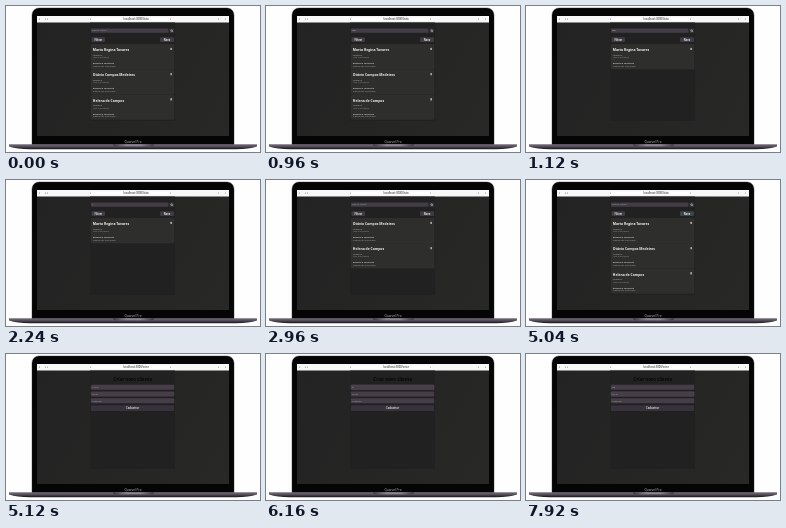
Recreate the animation shown at these times as an HTML page with a canvas. Size 254x146 px, loop 8 s.

```html
<!DOCTYPE html>
<html lang="pt-BR">
<head>
<meta charset="utf-8">
<title>Clientes</title>
<style>
html, body { margin: 0; width: 100%; height: 100%; overflow: hidden; background: #fefefe; }
canvas { display: block; width: 100vw; height: 100vh; }
</style>
</head>
<body>
<canvas></canvas>
<script>
const W = 254, H = 146, LOOP = 8000;
const canvas = document.querySelector('canvas');
const ctx = canvas.getContext('2d');
const clients = ['Marta Regina Tavares', 'Otávio Campos Medeiros', 'Helena de Campos'];

// Each entry is [start time, value]; the latest one reached is shown.
const searchText = [[0, ''], [880, 'm'], [960, 'ma'], [1680, 'm'], [1920, ''],
  [2160, 'c'], [2960, ''], [3040, '']];
const results = [[0, [0, 1, 2]], [1120, [0]], [2480, [1, 2]], [3440, [0, 1, 2]]];
const nameText = [[0, ''], [6160, 'C'], [6240, 'Cli']];
const at = (steps, t) => steps.filter(s => s[0] <= t).pop()[1];

function box(x, y, w, h, fill, radius = 0, stroke) {
  ctx.beginPath();
  ctx.roundRect(x, y, w, h, radius);
  ctx.fillStyle = fill;
  ctx.fill();
  if (stroke) {
    ctx.strokeStyle = stroke;
    ctx.lineWidth = .4;
    ctx.stroke();
  }
}

function text(str, x, y, size, color, weight = 400, align = 'left') {
  ctx.font = `${weight} ${size}px "Open Sans", sans-serif`;
  ctx.textAlign = align;
  ctx.fillStyle = color;
  ctx.fillText(str, x, y);
}

function shade(x0, y0, x1, y1, ...colors) {
  const g = ctx.createLinearGradient(x0, y0, x1, y1);
  colors.forEach((c, i) => g.addColorStop(i / (colors.length - 1), c));
  return g;
}

function laptop() {
  box(26, 2, 202, 137, '#050505', [7, 7, 0, 0], '#2c2c2e');
  text('Quarvel Pro', 127, 136.7, 3.1, '#bbb', 400, 'center');
  ctx.beginPath();
  ctx.moveTo(3, 138.2);
  ctx.lineTo(251, 138.2);
  ctx.lineTo(251, 140.4);
  ctx.quadraticCurveTo(243, 143, 230, 143.2);
  ctx.lineTo(24, 143.2);
  ctx.quadraticCurveTo(11, 143, 3, 140.4);
  ctx.fillStyle = shade(0, 138.2, 0, 143.2, '#77717c', '#514a57', '#17131b');
  ctx.fill();
  box(107, 138.2, 41, 2, shade(107, 0, 148, 0, '#39343d', '#8a8490', '#8a8490', '#39343d'), [0, 0, 2, 2]);
}

function browser(url) {
  box(31, 10, 192, 120, shade(31, 16, 223, 130, '#222322', '#282826'));
  box(31, 10, 192, 6.5, '#f8f8f8');
  box(83, 11, 84, 4.4, '#fff', 1, '#e6e6e6');
  text(url, 130, 14.2, 2.7, '#444', 600, 'center');
  [33, 39, 41, 84, 164, 212, 219].forEach(x => box(x, 12.6, 1, 1, '#777', .4));
  box(84, 16.5, 85, 98.5, '#212121');
}

function button(label, x, w, color) {
  box(x, 31.2, w, 4.8, color, .8);
  text(label, x + w / 2, 34.5, 2.5, '#eee', 700, 'center');
}

function card(name, y) {
  box(85, y, 83, 24.4, '#2e2e2c', .5, '#393937');
  text(name, 86.8, y + 6.6, 3.4, '#f8f8f8', 700);
  text('Telefone', 86.8, y + 11, 2.3, '#bbb');
  text('Não informado', 86.8, y + 13.6, 2.3, '#999');
  text('Endereço completo', 86.8, y + 19.6, 2.3, '#ddd', 600);
  text('Cidade não informada', 86.8, y + 22, 2.2, '#aaa');
  box(164.4, y + 3.2, 1.6, 2.4, '#aaa', .5);
}

function listPage(t) {
  const query = at(searchText, t);
  box(85, 22.6, 77.5, 4.2, '#443d48', .5);
  text(query || 'Buscar cliente', 86.3, 25.4, 2.2, query ? '#eee' : '#aaa');
  box(163.6, 22.6, 4.4, 4.4, '#39363b', .5);
  ctx.beginPath();
  ctx.arc(165.6, 24.6, .8, 0, 7);
  ctx.moveTo(166.2, 25.2);
  ctx.lineTo(167, 26);
  ctx.strokeStyle = '#ddd';
  ctx.lineWidth = .5;
  ctx.stroke();
  button('Filtrar', 85.5, 13.5, '#403a43');
  button('Novo', 154, 14, t < 4000 ? '#403a43' : t < 4080 ? '#3e4145' : '#3b464a');
  at(results, t).forEach((id, row) => card(clients[id], 38.5 + row * 25.2));
}

function field(value, placeholder, y, focused) {
  box(85, y, 83, 4.5, '#463d49', .5, focused ? '#655b6a' : '#4b424e');
  text(value || placeholder, 86.3, y + 3.1, 2.3, value ? '#eee' : '#aaa');
}

function formPage(t) {
  text('Criar novo cliente', 126.7, 26.5, 4.4, '#080808', 700, 'center');
  const second = t >= 7840;
  field(at(nameText, t), 'Nome', 31, t >= 5360 && !second);
  field('', 'Email', 37.8, second);
  field('', 'Telefone', 44.5, false);
  box(85, 51.3, 83, 5.6, '#37323b', .5);
  text('Cadastrar', 126.5, 55.1, 2.8, '#eee', 600, 'center');
}

function draw() {
  const t = performance.now() % LOOP;
  const form = t >= 5120;
  const ratio = devicePixelRatio;
  const width = Math.round(innerWidth * ratio), height = Math.round(innerHeight * ratio);
  if (canvas.width !== width || canvas.height !== height) {
    canvas.width = width;
    canvas.height = height;
  }
  ctx.setTransform(width / W, 0, 0, height / H, 0, 0);
  box(0, 0, W, H, '#fefefe');
  laptop();
  browser(form ? 'localhost:3000/criar' : 'localhost:3000/lista');
  form ? formPage(t) : listPage(t);
  requestAnimationFrame(draw);
}
draw();
</script>
</body>
</html>
```
